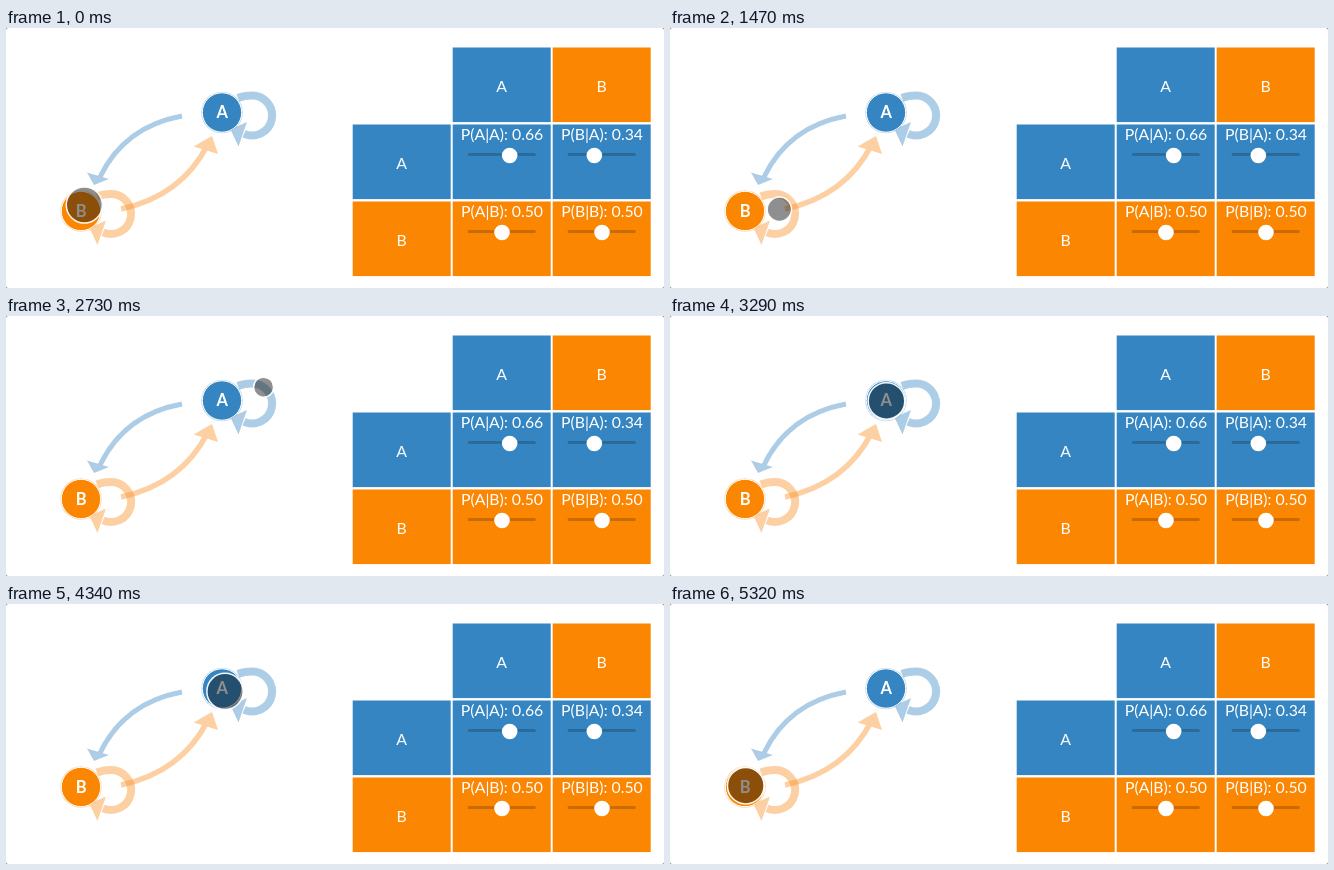
Write an HTML page that moves like this. It is 658 px wide and 260 px high and loops after 5.39 s.

```html
<!DOCTYPE html>
<html lang="en">
<head>
<meta charset="utf-8">
<title>Two-state Markov chain</title>
<style>
  html, body { margin: 0; width: 100%; height: 100%; overflow: hidden; background: #8a8a8a; }
  svg { display: block; width: 658px; height: 260px; }
  text { font-family: Lato, "Open Sans", sans-serif; font-size: 15.8px; fill: #fff; text-anchor: middle; }
  .name { font-size: 16.5px; font-weight: 700; }
  .link { opacity: .4; }
  .link path { fill: none; stroke: currentColor; }
  .link polygon { fill: currentColor; }
</style>
</head>
<body>
<svg id="stage" viewBox="0 0 658 260"></svg>
<script>
const LOOP = 5390, TICK = 70;
const BLUE = '#3485c2', ORANGE = '#fb8602', SOFT_ORANGE = '#f88c1c';
const NODES = {
  A: { x: 216, y: 84.5, color: BLUE },
  B: { x: 75, y: 183, color: ORANGE }
};
const stage = document.getElementById('stage');

function add(parent, tag, attrs, text) {
  const el = document.createElementNS('http://www.w3.org/2000/svg', tag);
  for (const key in attrs) el.setAttribute(key, attrs[key]);
  if (text) el.textContent = text;
  parent.appendChild(el);
  return el;
}

function addLink(color, width, d, head, shift = '') {
  const g = add(stage, 'g', { class: 'link', color, transform: shift });
  const path = add(g, 'path', { d, 'stroke-width': width });
  add(g, 'polygon', { points: head });
  return path;
}

add(stage, 'rect', { width: 658, height: 260, rx: 2.5, fill: '#fff' });

// Links between the states
const loopPath = 'M232,70 Q238,67.5 246,67.5 A20,20 0 1 1 238,105.8';
const loopHead = '224.5,101.5 241,94 232.5,118.5';
const dx = NODES.B.x - NODES.A.x, dy = NODES.B.y - NODES.A.y;
const links = {
  AB: addLink(BLUE, 5, 'M176,88 Q118.5,98.5 94,149', '88,157 81,144.5 103,151'),
  BA: addLink(SOFT_ORANGE, 5.5, 'M115,181 Q175,168 201,118', '206,108 187.5,118.5 212,126'),
  AA: addLink(BLUE, 8, loopPath, loopHead),
  BB: addLink(SOFT_ORANGE, 8, loopPath, loopHead, `translate(${dx} ${dy})`)
};

for (const [name, n] of Object.entries(NODES)) {
  add(stage, 'circle', { cx: n.x, cy: n.y, r: 20.8, fill: n.color, opacity: .3 });
  add(stage, 'circle', { cx: n.x, cy: n.y, r: 19.7, fill: n.color, stroke: '#fff', 'stroke-width': 1 });
  add(stage, 'text', { x: n.x + .3, y: n.y + 5.5, class: 'name' }, name);
}

// Transition table
const COLS = [346.7, 446.7, 546.7], ROWS = [20, 97, 174];

function addCell(col, row, color, label) {
  const x = COLS[col], y = ROWS[row];
  add(stage, 'rect', { x, y: y - .5, width: 98, height: 74.6, fill: color });
  if (label) add(stage, 'text', { x: x + 49, y: y + 44 }, label);
}

function addSlider(col, row, color, label, value) {
  addCell(col, row, color);
  const x = COLS[col], y = ROWS[row] + 30;
  add(stage, 'text', { x: x + 49.3, y: y - 15 }, `${label}: ${value.toFixed(2)}`);
  add(stage, 'rect', { x: x + 15, y: y - 2, width: 68, height: 3, rx: 1, fill: '#000', opacity: .2 });
  add(stage, 'circle', { cx: x + 25.3 + 48 * value, cy: y + .5, r: 7.8, fill: '#fff' });
}

addCell(1, 0, BLUE, 'A');
addCell(2, 0, ORANGE, 'B');
addCell(0, 1, BLUE, 'A');
addSlider(1, 1, BLUE, 'P(A|A)', .66);
addSlider(2, 1, BLUE, 'P(B|A)', .34);
addCell(0, 2, ORANGE, 'B');
addSlider(1, 2, ORANGE, 'P(A|B)', .5);
addSlider(2, 2, ORANGE, 'P(B|B)', .5);

// The walker: a quarter of each step leaves a state, half follows the link, a quarter arrives
const walker = add(stage, 'circle', {
  fill: '#141414', 'fill-opacity': .48, stroke: '#fff', 'stroke-opacity': .95, 'stroke-width': 1.5
});
const STEPS = ['AB', 'BB', 'BA', 'AA', 'AA', 'AB'];
// [time in ms, steps done]
const PACE = [[0, .86], [910, 1.715], [1960, 2.695], [2730, 3.406],
              [3780, 4.39], [4340, 4.871], [5320, 5.915], [LOOP, 5.98]];

function progress(t) {
  const i = PACE.findIndex(p => p[0] > t);
  const [t0, p0] = PACE[i - 1], [t1, p1] = PACE[i];
  return p0 + (p1 - p0) * (t - t0) / (t1 - t0);
}

function pointOn(key, k) {
  const path = links[key];
  const p = path.getPointAtLength(path.getTotalLength() * k);
  return key === 'BB' ? { x: p.x + dx, y: p.y + dy } : { x: p.x, y: p.y };
}

function draw(t) {
  const done = progress(t), step = Math.floor(done), phase = done - step;
  const key = STEPS[step];
  const p = pointOn(key, Math.min(1, Math.max(0, (phase - .25) * 2)));
  const node = NODES[phase < .5 ? key[0] : key[1]];
  // away: 0 at the state, 1 on the link
  const away = phase < .25 ? (phase * 4) ** 3 : phase > .75 ? ((1 - phase) * 4) ** 3 : 1;
  walker.setAttribute('cx', node.x + (p.x - node.x) * away);
  walker.setAttribute('cy', node.y + (p.y - node.y) * away);
  walker.setAttribute('r', 18.3 - 8.3 * away * away);
}

const start = performance.now();
function frame() {
  const t = (performance.now() - start) % LOOP;
  draw(Math.floor(t / TICK) * TICK);
  requestAnimationFrame(frame);
}
frame();
</script>
</body>
</html>
```
